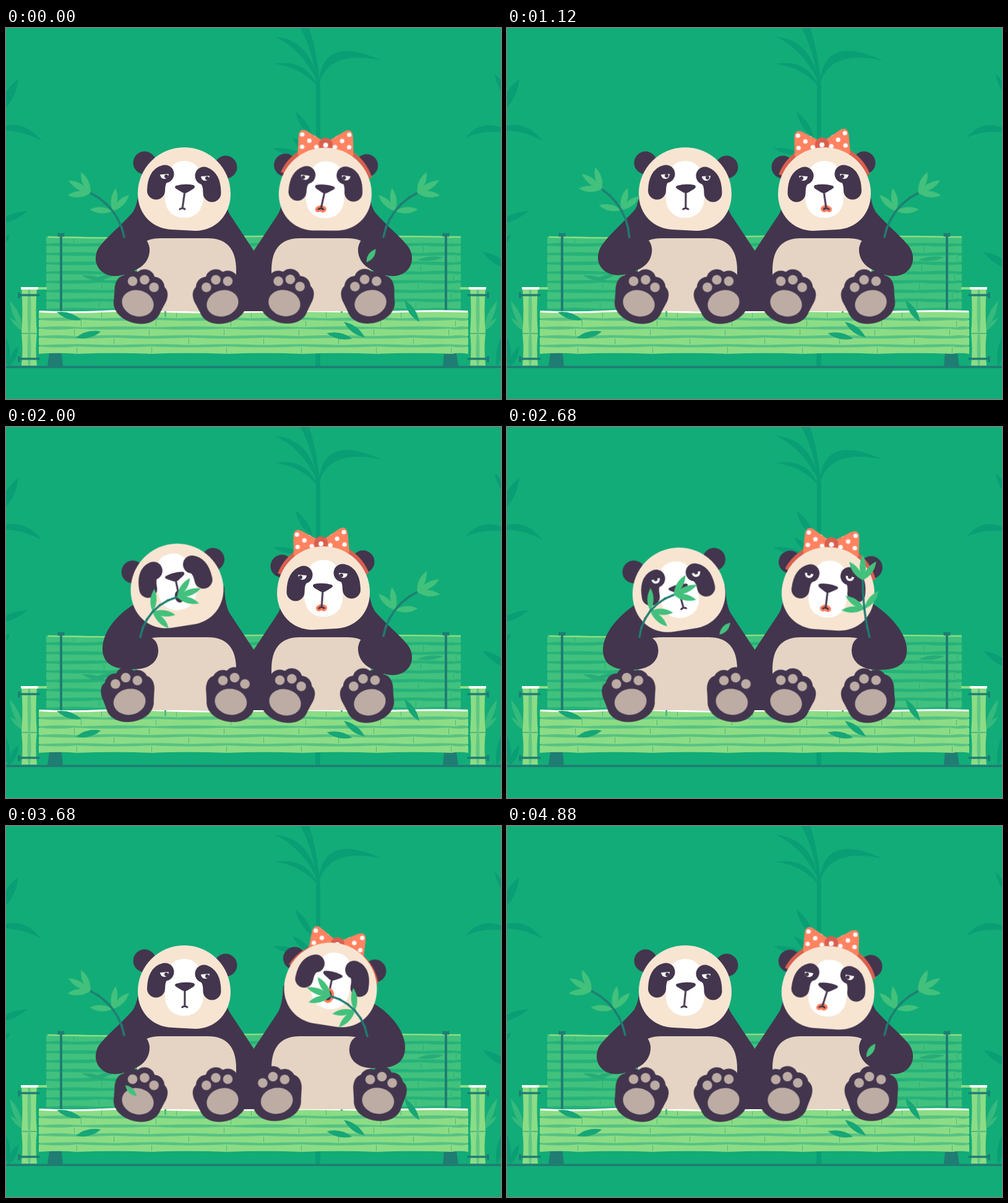
These frames come from a looping animation (800 px wide and 600 px high, 4920 ms). An HTML page:

```html
<!DOCTYPE html>
<html lang="en">
<head>
<meta charset="utf-8">
<title>Pandas on a bench</title>
<style>
html, body { margin: 0; width: 100%; height: 100%; overflow: hidden; background: #12ac78; }
svg { display: block; width: 100vw; height: 100vh; }
.anim { animation: 4920ms ease-in-out var(--d, 0s) infinite; }
.drop { animation-timing-function: linear; }
.dark { fill: #43354d; }
.line { fill: none; stroke: #43354d; stroke-width: 3; stroke-linecap: round; stroke-linejoin: round; }
.patch { fill: none; stroke: #43354d; stroke-width: 29; stroke-linecap: round; }
.stem { stroke: #1f7d73; stroke-width: 3.4; stroke-linecap: round; }
</style>
</head>
<body>
<svg id="stage" viewBox="0 0 800 600"></svg>
<script>
const LOOP = 4920, LAG = 1440;
const INK = '#1f7d73', LEAF = '#43c17c', PLANT = '#0a9e75', FUR = '#43354d', LIPS = '#ff7d5c';
let css = '';

// Adds a keyframe rule; times in ms.
function key(name, frames, prop = 'transform') {
  css += `@keyframes ${name}{${frames.map(([t, v]) => `${(t / LOOP * 100).toFixed(3)}%{${prop}:${v}}`).join('')}}` +
    `.${name}{animation-name:${name}}`;
}
// Eases from off to on at the start of each span and back at its end.
function pulse(name, off, on, ease, spans, prop) {
  const steps = spans.flatMap(([a, b]) => [[a, off], [a + ease, on], [b - ease, on], [b, off]]);
  key(name, [[0, off], ...steps, [LOOP, off]], prop);
}
const turn = (x, y, a) => `translate(${x}px,${y}px) rotate(${a}deg)`;
const at = (x, y, body, a = 0) => `<g transform="translate(${x} ${y}) rotate(${a})">${body}</g>`;
const mirror = (w, body) => `<g transform="translate(${w}) scale(-1 1)">${body}</g>`;
const move = (name, body) => `<g class="anim ${name}">${body}</g>`;
const circle = (x, y, r, fill) => `<circle cx="${x}" cy="${y}" r="${r}" fill="${fill}"/>`;
const path = (d, fill) => `<path d="${d}" fill="${fill}"/>`;
const rect = (x, y, w, h, fill) => `<rect x="${x}" y="${y}" width="${w}" height="${h}" fill="${fill}"/>`;

// A leaf that grows upwards from its foot, and one centred on a point.
const leaf = (len, w, fill) => path(`M0 0Q${w} ${-len / 2} 0 ${-len}Q${-w} ${-len / 2} 0 0Z`, fill);
const lying = (x, y, a, len, fill, w = 9) => at(x, y, at(0, len / 2, leaf(len, w, fill)), a);

// A pointed blade bent through a control point.
function blade(x1, y1, cx, cy, x2, y2, w) {
  const len = Math.hypot(x2 - x1, y2 - y1), nx = (y1 - y2) / len * w, ny = (x2 - x1) / len * w;
  return path(`M${x1} ${y1}Q${cx + nx} ${cy + ny} ${x2} ${y2}Q${cx - nx} ${cy - ny} ${x1} ${y1}Z`, PLANT);
}

/* ---------- scenery ---------- */
function plants() {
  return path('M500 547L501 95Q500 45 476 0H490Q503 40 508 95L508 547Z', PLANT) +
    blade(505, 94, 514, 20, 608, 53, 14) + blade(434, 14, 484, 26, 503, 86, 10) +
    blade(434, 58, 482, 56, 505, 97, 8) +
    lying(482, 157, -33, 53, PLANT, 10) + lying(456, 200, -78, 52, PLANT) + lying(479, 192, -48, 42, PLANT) +
    blade(-20, 168, 20, 150, 58, 183, 11) + blade(742, 178, 775, 150, 820, 172, 11) +
    lying(4, 111, 29, 66, PLANT, 14) + lying(8, 307, 68, 59, PLANT, 10) + lying(-3, 343, 48, 25, PLANT) +
    lying(802, 96, 150, 50, PLANT) + lying(795, 377, 121, 58, PLANT, 12) +
    lying(0, 520, -8, 54, PLANT, 12) + lying(12, 531, 25, 36, PLANT) + lying(798, 522, 10, 54, PLANT, 10);
}

// One bamboo cane, cut into pieces that are thinner in the middle.
function cane(y, h, x0, x1, first, gap, fill, tick) {
  let out = '', a = x0;
  for (let b = first; a < x1; b += gap) {
    const e = Math.min(b, x1), m = (a + e) / 2;
    out += path(`M${a} ${y}Q${m} ${y + 3} ${e} ${y}V${y + h}Q${m} ${y + h - 3} ${a} ${y + h}Z`, fill);
    if (e < x1) out += rect(e - 1, y + 1, 2, h - 2, tick);
    a = e;
  }
  return out;
}

function post() {
  const pole = x => path(`M${x} 421h11q-3 36 0 73q-3 26 0 52h-11q3-26 0-52q3-37 0-73Z`, '#8cdc85') +
    rect(x, 493, 11, 2, '#4fba7e');
  const tie = y => `<path class="stem" d="M22 ${y}H53M21 ${y - 3}V${y + 4}"/>`;
  return lying(17, 465, -24, 52, '#35b97c') + lying(18, 480, -45, 32, '#35b97c', 6) +
    rect(50, 419, 16, 4, '#8cdc85') + rect(27, 421, 21, 125, '#5fc783') + pole(25) + pole(39) +
    rect(24, 419, 28, 4, '#fff') + tie(432) + tie(535);
}

function bench() {
  let out = rect(66, 338, 668, 119, '#25b27a');
  for (let i = 0; i < 8; i++)
    out += cane(337 + i * 15, 12, 65, 735, 110 + i * 53 % 110, 128, '#41c17d', '#25b27a');
  out += '<path d="M68 338Q200 341 330 338T735 338" fill="none" stroke="#8cdc85" stroke-width="2.5"/>';
  const pole = rect(87, 332, 4, 126, INK) + '<path class="stem" d="M85 333L93 336M93 333L85 336"/>';
  const leg = path('M70 526H90L92 547H67Z', INK);
  out += pole + mirror(800, pole) + leg + mirror(798, leg);
  for (const [x, y, a] of [[143, 405, 103], [158, 403, 74], [686, 373, 84]]) out += lying(x, y, a, 42, '#27ac78', 7);
  out += rect(54, 458, 692, 68, '#56c283');
  [155, 122, 111, 175, 115].forEach((x, i) => {
    out += cane(457.5 + i * 14.4, 12, 53, 747, x, 121, '#8cdc85', '#4fba7e');
  });
  out += '<path d="M54 458.5Q105 461 155 458.5T257 458.5T400 459T543 458.5T645 458.5T746 458.5" fill="none" stroke="#fff" stroke-width="3"/>' +
    rect(256, 455, 3, 12, '#4fba7e') + rect(541, 455, 3, 6, '#4fba7e');
  for (const [x, y, a] of [[102, 466, 108], [133, 496, 76], [539, 498, 102], [563, 488, 127], [656, 458, 146]])
    out += lying(x, y, a, 42, '#17a676', 10);
  return out + post() + mirror(800, post()) + rect(0, 546.5, 800, 3.5, INK);
}

/* ---------- motion ---------- */
pulse('arm',
  'path("M216 284C196 312 164 336 150 355C138 375 148 398 172 401C184 402 198 398 210 391C226 384 233 370 232 356C230 342 222 338 212 336Z")',
  'path("M212 284C182 300 158 328 156 356C155 378 168 391 196 391C206 392 214 392 222 390C238 386 247 374 246 360C245 346 238 340 222 336Z")',
  260, [[1050, 2880]], 'd');
pulse('branch', turn(191, 338, -15), turn(217, 340, 15), 260, [[1030, 2880]]);
pulse('bend', 'rotate(-9deg)', 'rotate(11deg)', 280, [[1130, 2990]]);
pulse('head', turn(0, 0, 0), turn(-10, 2, -12), 240, [[1110, 3570]]);
pulse('lift', 'translate(0px,0px)', 'translate(0px,-6.5px)', 190, [[1380, 2460]]);
pulse('foot', 'rotate(16deg)', 'rotate(-9deg)', 240, [[1290, 3530]]);
pulse('open', 'scale(0)', 'scale(1)', 120, [[1400, 2360]]);
pulse('blink', 'scale(1,1)', 'scale(1,0)', 80, [[1340, 2560], [3180, 3400]]);
pulse('look', 'translate(3px,0px)', 'translate(0px,-3px)', 300, [[1000, 3400]]);

// The jaw swings from side to side, except while biting.
key('chew', Array.from({ length: 31 }, (_, i) => {
  const t = i * LOOP / 30, biting = t > 1000 && t < 2700;
  return [t, `skewX(${biting ? 0 : i % 2 ? 11 : -8}deg)`];
}));

const drift = (side, size) =>
  `translate(calc(var(--dx)*${side}),${side * 65}px) rotate(calc(var(--a) + ${side * 25}deg)) scale(${size})`;
key('drop', [[0, drift(-1, 0)], [100, drift(-.8, 1)], [900, drift(.8, 1)], [1000, drift(1, 0)], [LOOP, drift(1, 0)]]);

/* ---------- pandas ---------- */
function foot() {
  const toes = (r, fill) => [-1, 0, 1].map(i => circle(i * 18, i ? -32 : -39.5, r, fill)).join('');
  return move('foot', at(0, -31,
    path('M-32-38C-44-34-45-20-42-10L-39 4C-36 42 36 42 39 4L42-10C45-20 44-34 32-38Z', FUR) +
    toes(17, FUR) + toes(7.8, '#bcaca4') + '<ellipse rx="26" ry="21" fill="#bcaca4"/>'));
}

const spray = (...angles) => angles.map(a => at(0, 0, leaf(a ? 37 : 41, 10, LEAF), a)).join('');

// A chain of short links that all bend by the same angle.
function branch(step = 0) {
  const len = 15.5;
  if (step === 6) return spray(-36, 36, 0);
  const link = (step === 3 ? spray(88, 50, -44) : '') +
    `<path class="stem" d="M0 0V${-len}"/>` + at(0, -len, branch(step + 1));
  return move(step ? 'bend' : 'branch', link);
}

function bow() {
  const lobe = path('M6-7L31-22Q43-27 44-13L45 14Q44 24 34 21L6 9Z', '#ff8360') +
    path('M6-7L31-22Q43-27 44-13L45 14Q44 24 34 21L6 9Z', 'url(#dots)');
  return '<path d="M218 238A75 75 0 0 1 358 238" fill="none" stroke="#d9604f" stroke-width="8"/>' +
    at(292, 188, lobe + mirror(0, lobe) + circle(0, 0, 11, '#d9604f') + circle(0, 1, 4, '#fff'), 3);
}

const eye = (x, y) => at(x, y, move('blink',
  path('M-7-2L7-3Q6 5 0 5Q-6 5-7-2Z', '#fff') + move('look', circle(0, 1, 3, FUR))));

function mouth(lady) {
  const lips = lady ? `<path d="M-4 29Q0 26 4 29" fill="none" stroke="${LIPS}" stroke-width="10" stroke-linecap="round"/>` : '';
  const ring = lady ? `stroke="${LIPS}" stroke-width="4"` : '';
  return at(289, 264, move('chew', lips + '<path class="line" d="M0 0V27M-4 29Q0 26 4 29"/>' +
    at(0, 28, move('open', `<ellipse class="dark" rx="7" ry="10" ${ring}/>`))));
}

function head(lady) {
  const ears = circle(224, 218, 18.5, FUR) + circle(355, 225, 18.5, FUR);
  const skull = path('M288 193C330 193 363 227 363 268C363 303 338 328 306 328L268 326C238 325 213 302 213 268C213 227 246 193 288 193Z', '#f7e5d2');
  const muzzle = path('M288 215C305 215 314 226 316 244Q319 258 319 272C319 295 306 307 288 307C270 307 257 295 257 275Q257 258 260 244C263 226 271 215 288 215Z', '#fff');
  const patches = '<path class="patch" d="M257 236Q243 239 242.5 263M320 239Q333 244 333 267"/>';
  const nose = path('M275 255Q289 251 303 254Q307 256 303 260L293 266Q289 268 285 266L275 260Q271 257 275 255Z', FUR);
  const face = muzzle + patches + eye(256, 239) + eye(322, 242) + move('lift', mouth(lady) + nose);
  return at(288, 268, move('head', at(-288, -268,
    ears + (lady ? bow() : '') + move('lift', skull + move('lift', face)))));
}

function panda(lady) {
  return path('M214 260Q214 282 206 296L212 390V458H401V361L362 302Q354 290 353 258Z', FUR) +
    path('M212 458V385Q205 340 250 340H326Q372 340 372 392V458Z', '#e5d4c3') +
    '<path class="dark anim arm"/>' +
    at(204.5, 475, foot()) + at(358.5, 475, mirror(0, foot())) + head(lady) + branch();
}

// A falling leaf that is halfway down, at the given point, at time t.
const fall = (t, x, y, dx, angle) => at(x, y,
  `<g class="anim drop" style="--d:${t - 500 - LOOP}ms;--dx:${dx}px;--a:${angle}deg">${lying(0, 0, 0, 26, LEAF)}</g>`);

document.getElementById('stage').innerHTML = `<style>${css}</style>
  <pattern id="dots" width="23" height="20" x="10" y="-21" patternUnits="userSpaceOnUse">
    ${circle(5, 5, 3.6, '#fff')}${circle(16.5, 15, 3.6, '#fff')}</pattern>` +
  rect(0, 0, 800, 600, '#12ac78') + plants() + bench() + panda(false) +
  `<g style="--d:${LAG - LOOP}ms">${mirror(801, panda(true))}</g>` +
  fall(2680, 352, 326, 45, 42) + fall(3280, 222, 376, -25, 114) + fall(4200, 363, 413, 20, 42) +
  fall(4200, 468, 357, -25, -28) + fall(LOOP, 590, 368, 25, 35);
</script>
</body>
</html>
```
